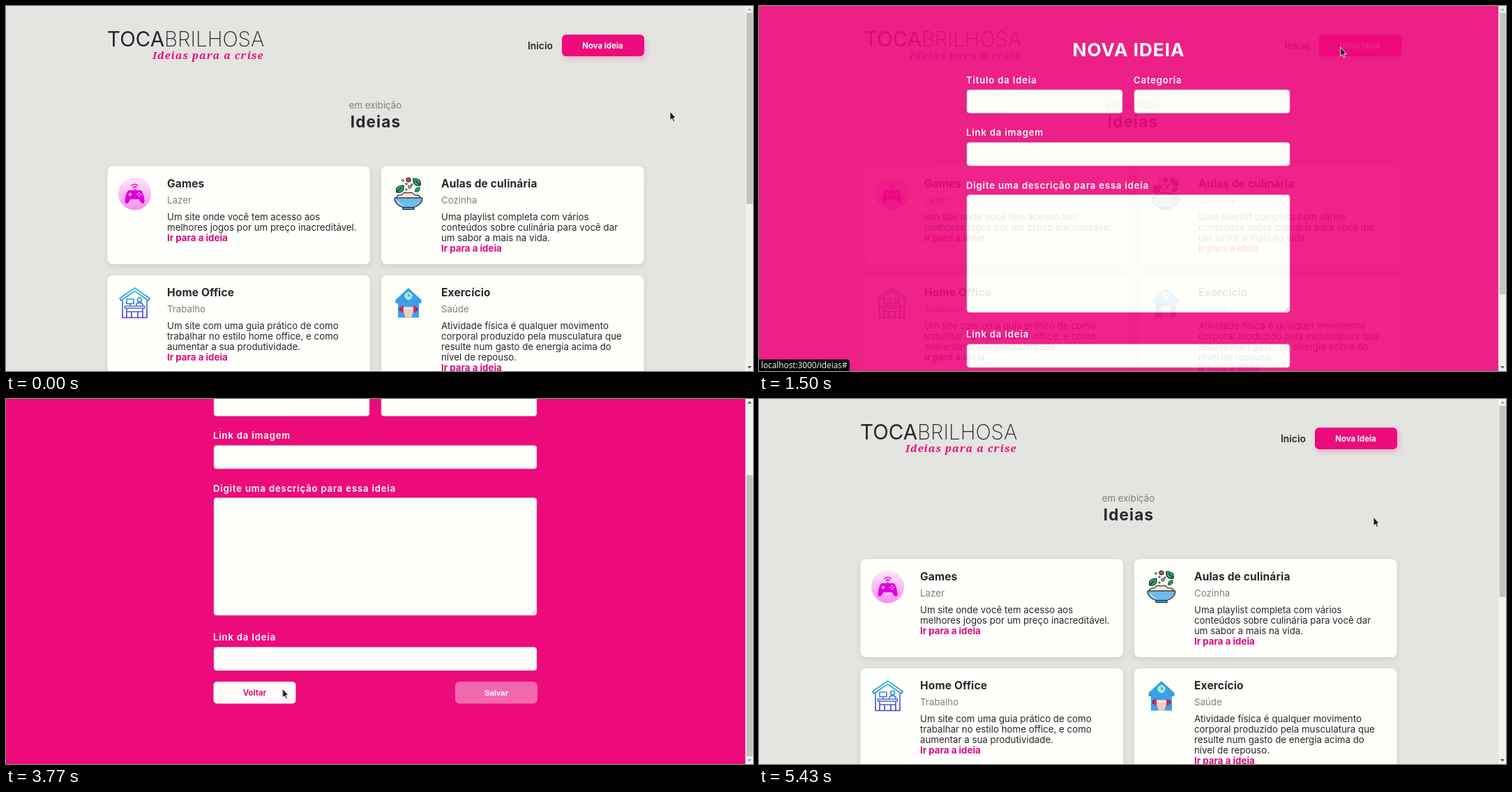
These frames come from a looping animation (1071 by 523 pixels, 6.01 s). An HTML page:

```html
<!DOCTYPE html>
<html lang="pt-BR">
<head>
<meta charset="utf-8">
<title>Ideias</title>
<style>
  @property --scroll { syntax: "<length>"; inherits: true; initial-value: 0px; }

  :root { --loop: 6010ms; --pink: #ed0a7b; --paper: #fffffb; --bg: #e4e4e1; --ink: #28282b; }
  html, body { margin: 0; width: 100%; height: 100%; overflow: hidden; background: var(--bg); }
  svg { display: block; width: 1071px; height: 523px; }
  text { font-family: Inter, sans-serif; fill: var(--ink); white-space: pre; }

  .mid { text-anchor: middle; }
  .nav { font-size: 13.8px; font-weight: 600; }
  .btn { font-size: 11.4px; font-weight: 700; fill: var(--paper); text-anchor: middle; }
  .h1 { font-size: 22.6px; font-weight: 700; letter-spacing: 1.1px; }
  .h3 { font-size: 15.5px; font-weight: 700; letter-spacing: .15px; }
  .sub { font-size: 13.3px; fill: #7f7f7f; }
  .txt { font-size: 13.3px; }
  .go { font-size: 13.3px; font-weight: 700; fill: #d9087f; }
  .brand { font-size: 29.5px; }
  .tag { font: italic 700 14.5px "Noto Serif", serif; letter-spacing: 1.1px; fill: var(--pink); }
  .title { font-size: 26.3px; font-weight: 700; letter-spacing: .9px; fill: var(--paper); }
  .label { font-size: 13.2px; font-weight: 600; letter-spacing: .8px; fill: var(--paper); }
  .url { font: 11.8px "Open Sans", sans-serif; fill: #fff; }
  .card { fill: var(--paper); filter: drop-shadow(0 3px 5px rgba(0, 0, 0, .09)); }
  .field { fill: var(--paper); stroke: #d69ab8; stroke-width: .7; }

  .home { animation: shift var(--loop) step-end infinite; }
  .page-bar { animation: page-bar var(--loop) step-end infinite; }
  .modal { opacity: 0; animation: fade var(--loop) linear infinite, scroll var(--loop) linear infinite; }
  .form { transform: translateY(calc(-1 * var(--scroll))); }
  .thumb { transform: translateY(calc(.767 * var(--scroll))); }
  .up { fill: #a3a3a3; animation: up var(--loop) step-end infinite; }
  .down { fill: #505050; animation: down var(--loop) step-end infinite; }
  .new { fill: var(--pink); filter: drop-shadow(3px 4px 4px rgba(237, 10, 123, .22)); animation: new-hover var(--loop) linear infinite; }
  .back { fill: #f268ad; animation: back-hover var(--loop) linear infinite; }
  .back-text { animation: back-text var(--loop) linear infinite; }
  .status { opacity: 0; animation: status var(--loop) linear infinite; }
  .cursor { animation: cursor var(--loop) linear infinite; }

  @keyframes shift { 0%, 77.1% { transform: none } 20.2% { transform: translateX(6px) } }
  @keyframes page-bar { 0%, 77.1% { opacity: 1 } 20.2% { opacity: 0 } }
  @keyframes fade {
    0% { opacity: 0 }
    20.2% { opacity: 0; animation-timing-function: ease }
    27.95% { opacity: 1 }
    77.1% { opacity: 1; animation-timing-function: ease }
    84.8%, 100% { opacity: 0 }
  }
  @keyframes scroll {
    0%, 38.4% { --scroll: 0px }
    39.43% { --scroll: 21px }
    41% { --scroll: 52px }
    42.6% { --scroll: 74px }
    44.4% { --scroll: 106px }
    45.4% { --scroll: 111px }
    48.2%, 77.1% { --scroll: 129px }
    77.11%, 100% { --scroll: 0px }
  }
  @keyframes up { 0%, 77.1% { fill: #a3a3a3 } 38.5% { fill: #505050 } }
  @keyframes down { 0%, 77.1% { fill: #505050 } 48.2% { fill: #a3a3a3 } }
  @keyframes new-hover {
    0%, 13.8% { fill: #ed0a7b }
    15%, 20% { fill: #f2228c }
    21%, 100% { fill: #ed0a7b }
  }
  @keyframes back-hover {
    0%, 60.9% { fill: #f268ad }
    62.8%, 77.1% { fill: #fffffb }
    78.5%, 100% { fill: #f268ad }
  }
  @keyframes back-text {
    0%, 60.9% { fill: #fffffb }
    62.8%, 77.1% { fill: #d9087f }
    78.5%, 100% { fill: #fffffb }
  }
  @keyframes status {
    0%, 18.3% { opacity: 0 }
    19.5%, 29.1% { opacity: 1 }
    30.9%, 63.1% { opacity: 0 }
    64.4%, 85.4% { opacity: 1 }
    86.7%, 100% { opacity: 0 }
  }
  @keyframes cursor {
    0%, 6.6% { transform: translate(952px, 151px) }
    14.98%, 24.1% { transform: translate(849px, 58px) }
    27.79%, 28.7% { transform: translate(784px, 62px) }
    31.6%, 34.9% { transform: translate(785px, 95px) }
    38.3%, 44.6% { transform: translate(787px, 98px) }
    48.2%, 51.5% { transform: translate(786px, 105px) }
    54.1% { transform: translate(796px, 160px) }
    57.4% { transform: translate(670px, 300px) }
    61.56% { transform: translate(405px, 414px) }
    68.72%, 77.5% { transform: translate(353px, 420px) }
    81.03% { transform: translate(540px, 250px) }
    87.02%, 88.6% { transform: translate(859px, 172px) }
    90.35%, 100% { transform: translate(881px, 169px) }
  }
</style>
</head>
<body>
<svg viewBox="0 0 1071 523">
  <defs>
    <linearGradient id="orb" x2="0" y2="1">
      <stop stop-color="#fdeafc"/><stop offset="1" stop-color="#f98df0"/>
    </linearGradient>
    <linearGradient id="line" gradientUnits="userSpaceOnUse" x1="0" y1="0" x2="0" y2="44">
      <stop stop-color="#22c3e6"/><stop offset="1" stop-color="#5a3fc8"/>
    </linearGradient>
    <path id="leaf" d="M-5 5C-7-2-2-5 5-5C6 2 2 7-5 5ZL2-2" fill="#1fb36b" stroke="#26262c" stroke-width="1.2"/>
    <path id="arrow-up" d="M1063 6.5h6l-3-3.5z"/>
    <path id="arrow-down" d="M1063 516h6l-3 3.5z"/>
  </defs>

  <rect width="1071" height="523" fill="var(--bg)"/>

  <g class="home">
    <text class="brand" x="145" y="58">TOCA<tspan font-weight="200">BRILHOSA</tspan></text>
    <text class="tag" x="210" y="76">Ideias para a crise</text>
    <text class="nav" x="748" y="62">Inicio</text>
    <rect class="new" x="797" y="41" width="118" height="31" rx="6"/>
    <text class="btn" x="855.5" y="60.5">Nova Ideia</text>

    <text class="sub mid" x="529.5" y="147">em exibição</text>
    <text class="h1 mid" x="530" y="174">Ideias</text>

    <rect class="card" x="145.5" y="229.5" width="376.5" height="140.5" rx="8"/>
    <rect class="card" x="538" y="229.5" width="376.5" height="140.5" rx="8"/>
    <rect class="card" x="145.5" y="386" width="376.5" height="156" rx="8"/>
    <rect class="card" x="538" y="386" width="376.5" height="156" rx="8"/>

    <text class="h3" x="231" y="259.5">Games</text>
    <text class="sub" x="231" y="283">Lazer</text>
    <text class="txt" x="231" y="306.5">Um site onde você tem acesso aos<tspan x="231" dy="15">melhores jogos por um preço inacreditável.</tspan></text>
    <text class="go" x="231" y="336.5">Ir para a ideia</text>

    <text class="h3" x="624" y="259.5">Aulas de culinária</text>
    <text class="sub" x="624" y="283">Cozinha</text>
    <text class="txt" x="624" y="306.5">Uma playlist completa com vários<tspan x="624" dy="15">conteúdos sobre culinária para você dar</tspan><tspan x="624" dy="15">um sabor a mais na vida.</tspan></text>
    <text class="go" x="624" y="351.5">Ir para a ideia</text>

    <text class="h3" x="231" y="415.5">Home Office</text>
    <text class="sub" x="231" y="439">Trabalho</text>
    <text class="txt" x="231" y="462.5">Um site com uma guia prático de como<tspan x="231" dy="15">trabalhar no estilo home office, e como</tspan><tspan x="231" dy="15">aumentar a sua produtividade.</tspan></text>
    <text class="go" x="231" y="507.5">Ir para a ideia</text>

    <text class="h3" x="624" y="415.5">Exercício</text>
    <text class="sub" x="624" y="439">Saúde</text>
    <text class="txt" x="624" y="462.5">Atividade física é qualquer movimento<tspan x="624" dy="15">corporal produzido pela musculatura que</tspan><tspan x="624" dy="15">resulte num gasto de energia acima do</tspan><tspan x="624" dy="15">nível de repouso.</tspan></text>
    <text class="go" x="624" y="522.5">Ir para a ideia</text>

    <!-- gamepad -->
    <g transform="translate(184.5 269)">
      <circle r="23.5" fill="url(#orb)"/>
      <path d="M-4.5-11.5Q0-16 4.5-11.5M-2.3-9Q0-11.2 2.3-9M0-7V-4" fill="none" stroke="#dd00d8" stroke-width="1.6" stroke-linecap="round"/>
      <path d="M-8-5H8C12-5 14 8 14 11C14 15 10 15 8 11L6 8H-6L-8 11C-10 15-14 15-14 11C-14 8-12-5-8-5Z" fill="#dd00d8"/>
      <path d="M-9 1h5M-6.5-1.5v5" stroke="#fbc4f6" stroke-width="1.6"/>
      <g fill="#fbc4f6"><circle cx="6.5" cy="-1.5" r="1.1"/><circle cx="6.5" cy="3.5" r="1.1"/><circle cx="4" cy="1" r="1.1"/><circle cx="9" cy="1" r="1.1"/></g>
    </g>

    <!-- rice bowl -->
    <g transform="translate(577 268)" stroke="#26262c" stroke-width="1.2" stroke-linejoin="round">
      <path d="M-18 7Q-16 2-10 3Q-7-2-1 0Q6-2 9 3Q16 2 18 7Z" fill="#f6e4d3"/>
      <path d="M-20 7H20C20 14 14 19 8 20.500H-8C-14 19-20 14-20 7Z" fill="#6fbbe9"/>
      <path d="M-8 20.500H8V23.500H-8Z" fill="#4b93c9"/>
      <path d="M-16 11Q-14 16-8 17" stroke="#d3edfb" fill="none"/>
      <use href="#leaf" x="-12" y="-6"/>
      <use href="#leaf" transform="translate(12 -16) scale(-1 1)"/>
      <use href="#leaf" transform="translate(13 -5) scale(.65)"/>
      <circle cx="0" cy="-19" r="3" fill="#c5563c"/>
      <circle cx="2" cy="-9" r="2" fill="#f4d8c4"/>
      <g fill="#fff" stroke-width=".9"><circle cx="-8" cy="-18" r="1.5"/><circle cx="-3" cy="-13" r="1.3"/><circle cx="5" cy="-12" r="1.2"/><circle cx="-3" cy="-5" r="1.2"/></g>
    </g>

    <!-- desk in a house -->
    <g transform="translate(162 403)" fill="none" stroke="url(#line)" stroke-width="1.7" stroke-linejoin="round">
      <path d="M1 16L22.500 1L44 16L42 19L22.500 5.500L3 19ZM5 19V43.500H40V19"/>
      <path d="M8.500 27H36.500V30H8.500ZM11 30V43M34 30V43M11 35H34M18 35V43M27 35V43"/>
      <path d="M11 17H21V23.500H11ZM16 23.500V27M25 27V24Q29 20 34 24V27"/>
      <circle cx="29.500" cy="18" r="3"/>
    </g>

    <!-- gym house -->
    <g transform="translate(577 404)">
      <path d="M0 0L18.500 17V22H15V42.500H-15V22H-18.500V17Z" fill="#3aa0ea"/>
      <circle cy="11.500" r="5" fill="#8ff0c0" stroke="#d9fbee"/>
      <path d="M0 8.500V11.500H2.500" fill="none" stroke="#2b6fae"/>
      <path d="M-7 27H7V34L4 42.500H-4L-7 34Z" fill="#f1cdbd"/>
      <path d="M-11 30H11" stroke="#e8e8ee" stroke-width="2"/>
      <path d="M-11 26h4v9h-4zM7 26h4v9h-4z" fill="#d52c62"/>
      <path d="M-13 28h2v5h-2zM11 28h2v5h-2z" fill="#8f2150"/>
    </g>
  </g>

  <g class="modal">
    <rect width="1071" height="523" fill="var(--pink)"/>
    <g class="form">
      <text class="title mid" x="530" y="71.500">NOVA IDEIA</text>
      <text class="label" x="297" y="110.500">Titulo da Ideia</text>
      <text class="label" x="537" y="110.500">Categoria</text>
      <rect class="field" x="298" y="120" width="223" height="33.500" rx="4"/>
      <rect class="field" x="538" y="120" width="223" height="33.500" rx="4"/>
      <text class="label" x="297" y="186">Link da imagem</text>
      <rect class="field" x="298" y="195.500" width="463" height="33.500" rx="4"/>
      <text class="label" x="297" y="261.500">Digite uma descrição para essa ideia</text>
      <rect class="field" x="298" y="270.500" width="463" height="168.500" rx="4"/>
      <path d="M754 438l6-6M757.500 438l2.500-2.500" stroke="#777" stroke-width=".8"/>
      <text class="label" x="297" y="475">Link da Ideia</text>
      <rect class="field" x="298" y="484.500" width="463" height="33.500" rx="4"/>
      <rect class="back" x="297.500" y="534" width="118" height="31.500" rx="5"/>
      <text class="btn back-text" x="356.500" y="554">Voltar</text>
      <rect x="644" y="534" width="118" height="31.500" rx="6" fill="#f268ad"/>
      <text class="btn" x="703" y="554" style="font-family: 'Liberation Sans', sans-serif">Salvar</text>
    </g>
    <rect x="1060" width="11" height="523" fill="#f1f1ee"/>
    <rect class="thumb" x="1061.500" y="10" width="9" height="403" fill="#c1c1bf"/>
    <use class="up" href="#arrow-up"/>
    <use class="down" href="#arrow-down"/>
  </g>

  <g class="page-bar">
    <rect x="1060" width="11" height="523" fill="#f1f1ee"/>
    <rect x="1061.500" y="10" width="9" height="273.500" fill="#c1c1bf"/>
    <use href="#arrow-up" fill="#a3a3a3"/>
    <use href="#arrow-down" fill="#505050"/>
  </g>

  <g class="status">
    <path d="M0 506.500H126Q130 506.500 130 510.500V523H0Z" fill="#000"/>
    <text class="url" x="3" y="519">localhost:3000/ideias#</text>
  </g>

  <path class="cursor" d="M0 0V13L2.900 10.300L4.800 14.800L6.800 13.900L4.900 9.500H8.500Z" fill="#1c1c1c" stroke="#fff" stroke-width=".9"/>
</svg>
</body>
</html>
```
